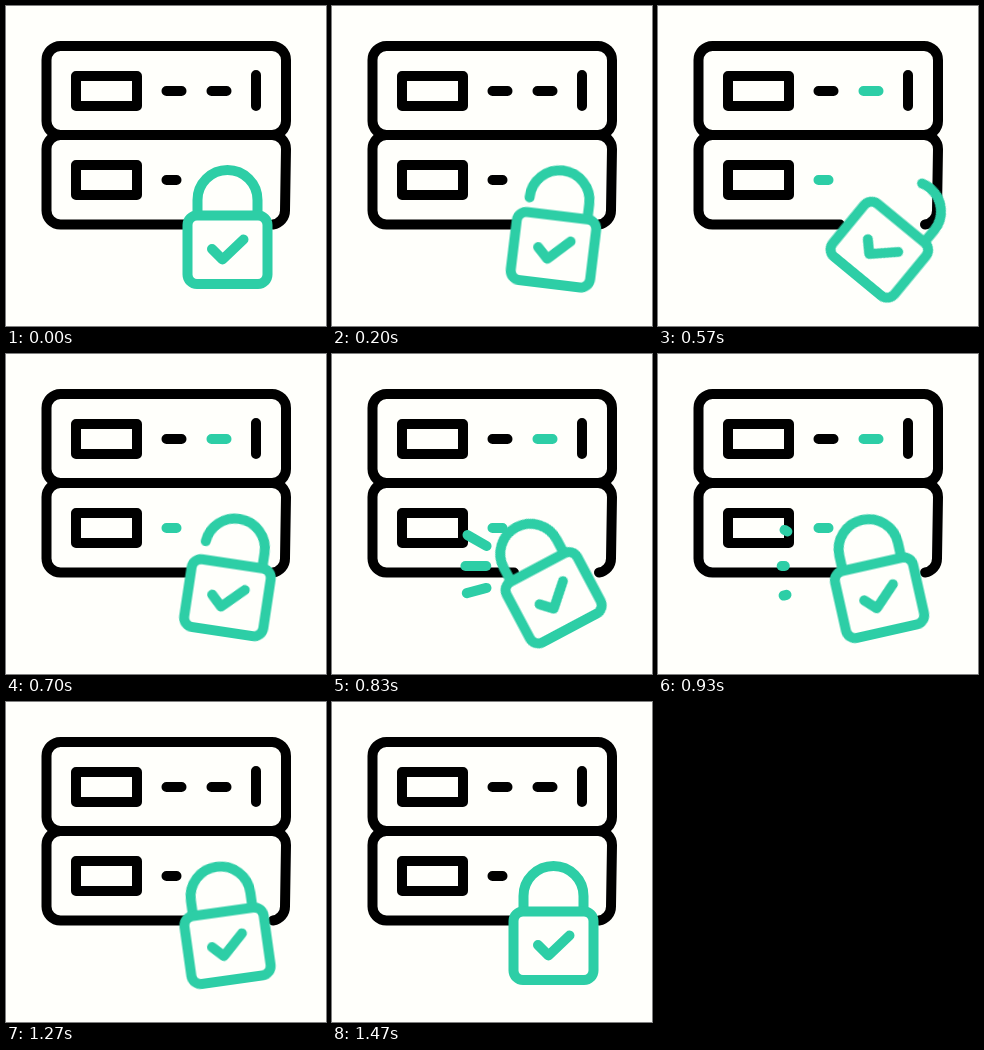
An HTML page without scripts that plays this animation: 320x320 px, repeating every 1510 ms.

```html
<!DOCTYPE html>
<html lang="en">
<head>
<meta charset="utf-8">
<title>Server lock</title>
<style>
  :root { --paper: #fffffb; --ink: #000; --mint: #2dcea6; --loop: 1510ms; }
  html, body { margin: 0; width: 100%; height: 100%; overflow: hidden; background: var(--paper); }
  svg { display: block; width: 100%; height: 100%; }

  .line { fill: none; stroke: var(--ink); stroke-width: 10; stroke-linecap: round; stroke-linejoin: round; }
  .mint { stroke: var(--mint); }
  .body { fill: var(--paper); }

  .light { animation: light var(--loop) step-end infinite; }
  .lock {
    transform-origin: 221.5px 243.5px;
    animation: swing var(--loop) cubic-bezier(.4, 0, .6, 1) infinite;
  }
  .shackle { stroke-dasharray: 100 200; animation: unlock var(--loop) ease-in-out infinite; }
  .spark { animation: spark var(--loop) linear infinite; }

  @keyframes light {
    0%, 81% { stroke: var(--ink); }
    13.5% { stroke: var(--mint); }
  }
  @keyframes swing {
    0%, 3.3% { transform: rotate(0deg); }
    38.4% { transform: rotate(39.5deg); }
    55.3% { transform: rotate(-28deg); }
    70.9% { transform: rotate(16deg); }
    84.1% { transform: rotate(-8deg); }
    97.4%, 100% { transform: rotate(0deg); }
  }
  /* the left end of the shackle retracts along its own curve */
  @keyframes unlock {
    0%, 5% { stroke-dashoffset: 0; }
    28%, 39.7% { stroke-dashoffset: -42.5; }
    51%, 100% { stroke-dashoffset: 0; }
  }
  @keyframes spark {
    0%, 48.9% { opacity: 0; stroke-dasharray: 0 300; stroke-dashoffset: 0; }
    49% { opacity: 1; stroke-dasharray: 0 300; stroke-dashoffset: 0; }
    55% { stroke-dasharray: 58 300; stroke-dashoffset: -10; }
    62.8% { opacity: 1; stroke-dasharray: 0 300; stroke-dashoffset: -100; }
    62.9%, 100% { opacity: 0; stroke-dasharray: 0 300; stroke-dashoffset: -100; }
  }
</style>
</head>
<body>
<svg viewBox="0 0 320 320">
  <g class="line">
    <rect x="40.5" y="40" width="239.5" height="89" rx="14"/>
    <path d="M182 218.5H54.5a14 14 0 0 1-14-14V143a14 14 0 0 1 14-14H266a14 14 0 0 1 14 14L279 204.5a14 14 0 0 1-12 14"/>
    <path d="M70 70h61v30h-61zM70 159h61v30h-61z"/>
    <path d="M160.5 85h15M250 69v31"/>
  </g>
  <path class="line light" d="M205.5 85h15M160.5 174h10"/>

  <g class="line mint">
    <path class="spark" pathLength="100" d="M158 194L125 175"/>
    <path class="spark" pathLength="100" d="M158 212H122"/>
    <path class="spark" pathLength="100" d="M158 233L124 242"/>
  </g>

  <g class="lock line mint">
    <path class="shackle" pathLength="100" d="M191.5 209V194a30 30 0 0 1 60 0V209"/>
    <rect class="body" x="181.5" y="209.5" width="80" height="68.5" rx="9.5"/>
    <path d="M206 243l10.5 10.5 21-20"/>
  </g>
</svg>
</body>
</html>
```
